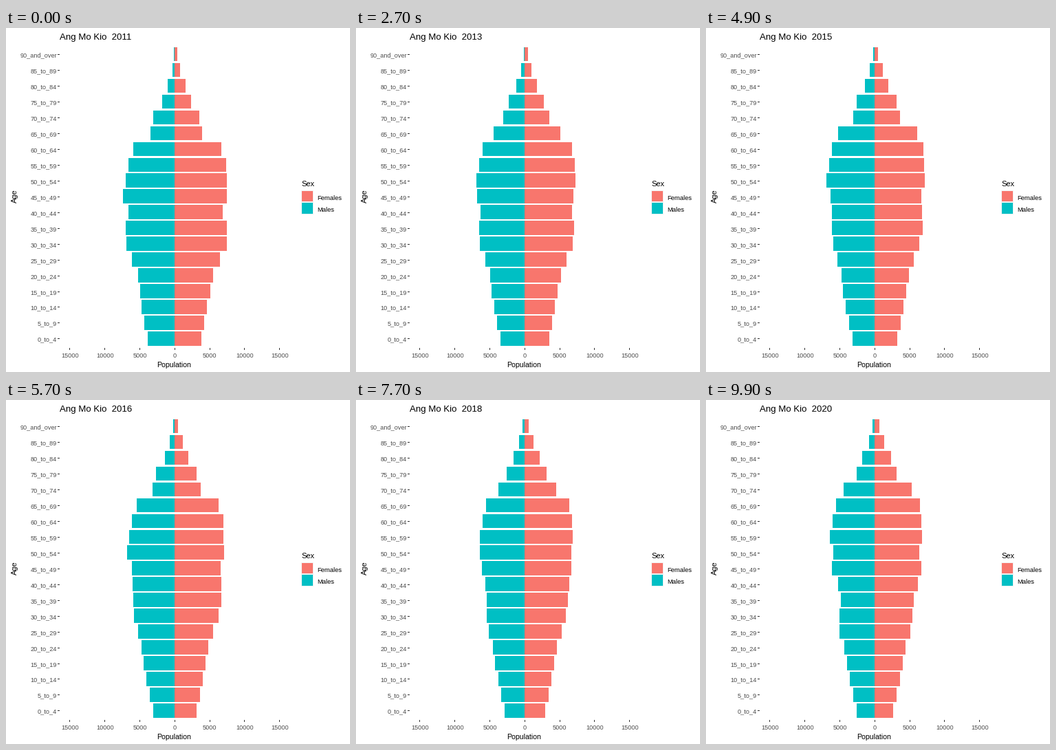
A matplotlib script for the animation above (10000 ms loop, 500 by 500 pixels).

```python
import numpy as np
import matplotlib.pyplot as plt
from matplotlib.animation import FuncAnimation
from matplotlib.patches import Rectangle

SIZE, DPI = 500, 100
FRAMES, INTERVAL = 100, 100
FIRST_YEAR, SPAN, STEPS_PER_YEAR = 2011, 9, 11
MID = 245            # x of the zero line
TOP, PITCH = 28.3, 22.96
PINK, TEAL = "#F8766D", "#00BFC4"
GREY, DARK, KEY = "#4D4D4D", "#333333", "#F2F2F2"

AGES = [f"{a}_to_{a + 4}" for a in range(0, 90, 5)] + ["90_and_over"]

# Cohort sizes (bar length in px) by age group in the first year;
# negative groups are children still to be born
COHORT = [-2, 0, 2, 4, 6, 7, 8, 9, 11, 12, 13, 14, 15, 17, 18]
MALES = [29, 39, 48, 53, 70, 71, 67, 75, 67, 60, 35, 31, 18, 3, 1]
FEMALES = [29, 39, 47, 56, 76, 76, 70, 76, 75, 68, 40, 36, 24, 8, 4]

# Share of a cohort that remains after the whole span, by group reached
REACHED = [0, 4, 5, 6, 7, 8, 9, 13, 15, 18]
REMAIN = [0.88, 0.91, 1.0, 0.93, 0.775, 0.76, 0.88, 0.86, 0.76, 0.35]

plt.rcParams["font.family"] = "Liberation Sans"
fig = plt.figure(figsize=(SIZE / DPI, SIZE / DPI), dpi=DPI, facecolor="white")
ax = fig.add_axes([0, 0, 1, 1])
ax.set_xlim(0, SIZE)
ax.set_ylim(SIZE, 0)
ax.axis("off")


def box(x, y, w, h, color):
    return ax.add_patch(Rectangle((x, y), w, h, facecolor=color,
                                  linewidth=0, antialiased=False))


def label(x, y, text, px=9.2, color="black", ha="left", rotation=0):
    return ax.text(x, y, text, fontsize=px * 72 / DPI, color=color, ha=ha,
                   va="baseline", rotation=rotation, rotation_mode="anchor")


def lengths(sizes, t, loss):
    """Bar lengths t years on: each cohort moves up one group in 5 years."""
    group = np.arange(len(AGES))
    remain = np.interp(group, REACHED, REMAIN) ** (loss * t / SPAN)
    return np.round(np.interp(group - t / 5, COHORT, sizes) * remain)


title = label(78, 17, "", 13.2)
label(MID - 0.5, 493, "Population", 10.5, ha="center")
label(16, 244, "Age", 11, ha="center", rotation=90)

for k in range(-3, 4):
    x = MID + 0.3 + 50.8 * k
    box(int(x), 465, 1, 3, DARK)
    label(x, 479, str(abs(k) * 5000), color=GREY, ha="center")

label(429.5, 230, "Sex", 11)
box(429, 236, 18, 35, KEY)
for y, h, name, color in ((237, 15, "Females", PINK), (254, 16, "Males", TEAL)):
    box(430, y, 16, h, color)
    label(452.5, y + 13, name, 9.4)

males, females = [], []
for row, age in enumerate(AGES):
    y = TOP + PITCH * (len(AGES) - 1 - row)
    top, mid, bottom = (int(y + f * PITCH) for f in (0, 0.45, 0.9))
    males.append(box(MID, top, 0, bottom - top, TEAL))
    females.append(box(MID, top, 0, bottom - top, PINK))
    box(75, mid, 3, 1, DARK)
    label(74, mid + 4, age, color=GREY, ha="right")


def update(i):
    t = i / STEPS_PER_YEAR
    title.set_text(f"Ang Mo Kio  {round(FIRST_YEAR + t)}")
    for bar, w in zip(males, lengths(MALES, t, 1)):
        bar.set_width(-w)
    for bar, w in zip(females, lengths(FEMALES, t, 0.7)):
        bar.set_width(w)
    return [title, *males, *females]


anim = FuncAnimation(fig, update, frames=FRAMES, interval=INTERVAL,
                     repeat=True, repeat_delay=0, blit=False)
plt.show()
```
